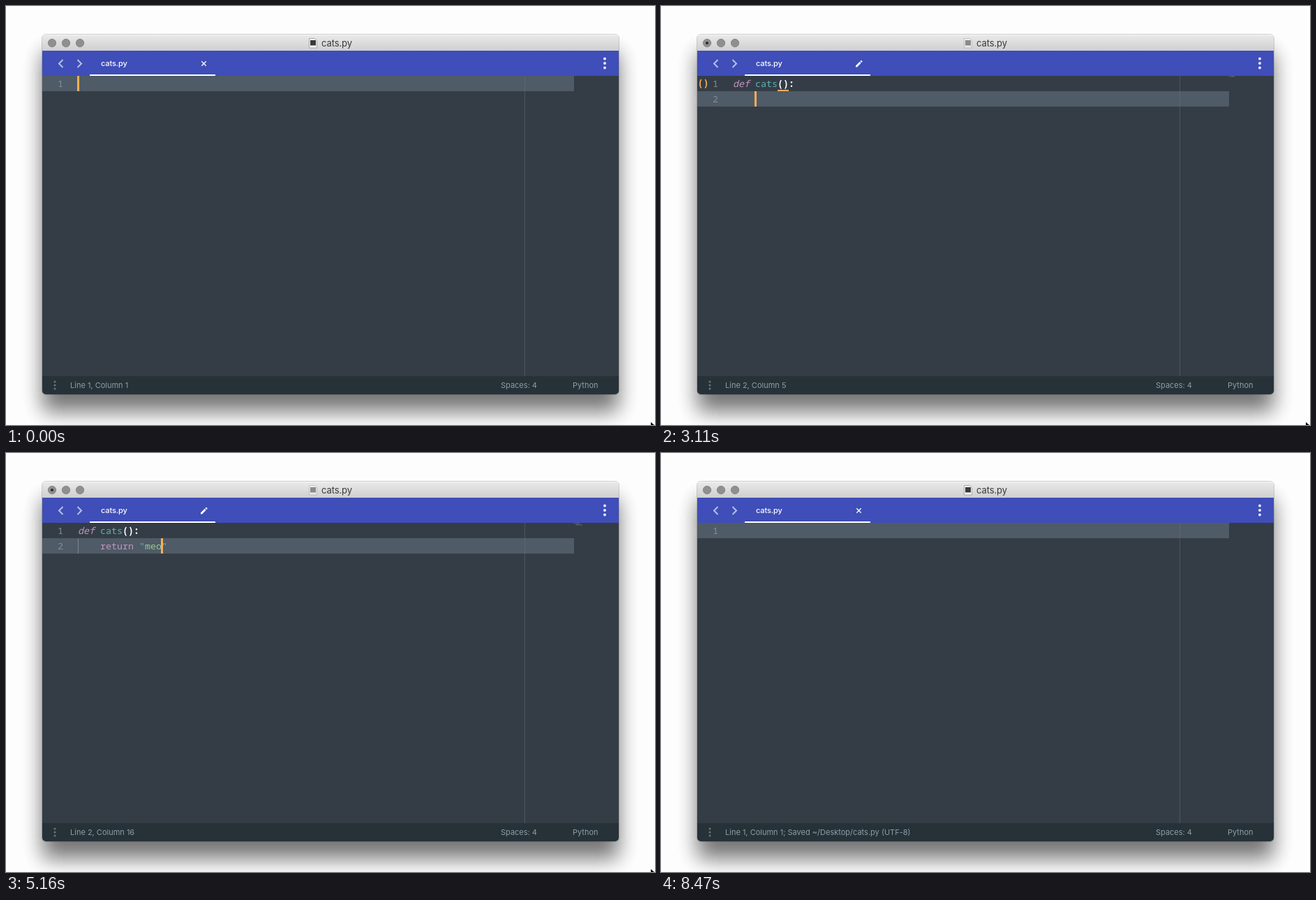
Animation of 930x600 px, one loop 8570 ms. Source, as an HTML page:

```html
<!DOCTYPE html>
<html lang="en">
<head>
<meta charset="utf-8">
<title>cats.py</title>
<style>
  html, body { margin: 0; width: 100%; height: 100%; overflow: hidden; background: #fdfdfd; }
  svg { display: block; }
  text { white-space: pre; }
  .ui { font: 11px Inter, "Open Sans", sans-serif; }
  .title { font-size: 13px; fill: #3a3a3a; letter-spacing: -.1px; }
  .tab { font-weight: 500; fill: #fff; letter-spacing: -.1px; }
  .status { fill: #8c9ea7; }
  .code { font: 13.333px "Noto Sans Mono", "DejaVu Sans Mono", monospace; fill: #d8dee9; }
  .num { fill: #848d96; }
  .def { fill: #c594c5; font-style: italic; }
  .key { fill: #c594c5; }
  .name, .quote { fill: #5fb3b3; }
  .str { fill: #99c794; }
  .punct { fill: #fff; font-weight: 700; }
</style>
</head>
<body>
<svg width="930" height="600" viewBox="0 0 930 600">
  <defs>
    <filter id="shade" filterUnits="userSpaceOnUse" x="-40" y="-20" width="1010" height="720">
      <feGaussianBlur stdDeviation="15"/>
      <feComponentTransfer><feFuncA id="bands" type="discrete"/></feComponentTransfer>
    </filter>
    <linearGradient id="chrome" x2="0" y2="1">
      <stop offset="0" stop-color="#ebeaeb"/>
      <stop offset="1" stop-color="#d0cfd0"/>
    </linearGradient>
    <clipPath id="frame"><rect x="52" y="41" width="826" height="515" rx="5"/></clipPath>
  </defs>

  <rect x="52" y="66" width="826" height="515" rx="5" filter="url(#shade)"/>
  <rect x="51.5" y="40.5" width="827" height="516" rx="5.5" fill="none" stroke="#000" stroke-opacity=".18"/>

  <g clip-path="url(#frame)">
    <rect x="52" y="41" width="826" height="23" fill="url(#chrome)"/>
    <rect x="52" y="41" width="826" height="1" fill="#f6f6f6"/>
    <rect x="52" y="64" width="826" height="36" fill="#3f4eb8"/>
    <rect x="52" y="100" width="826" height="430" fill="#343d46"/>
    <rect x="52" y="530" width="826" height="26" fill="#263238"/>
  </g>

  <g fill="#8f8f91" stroke="#7f7f81" stroke-width=".8">
    <circle cx="66" cy="53" r="5.7"/><circle cx="86" cy="53" r="5.7"/><circle cx="106" cy="53" r="5.7"/>
  </g>
  <circle id="dot" cx="66" cy="53" r="2.1" fill="#2c2c2e"/>

  <g id="doc">
    <path d="M434.5 46.500h8l3 3v10.500h-11z" fill="#fafafa" stroke="#a5a5a5"/>
    <rect x="436" y="49" width="8" height="7.500" fill="#3a3a3c"/>
  </g>
  <text class="ui title" x="452" y="58">cats.py</text>

  <g fill="none" stroke="#b9bfe6" stroke-width="2">
    <path d="M81.500 77l-5.500 5.500 5.500 5.500M102.500 77l5.500 5.500-5.500 5.500"/>
  </g>
  <text class="ui tab" x="136" y="86">cats.py</text>
  <rect x="120" y="98" width="180" height="2" fill="#fff"/>
  <path id="close" d="M280.300 79.300l6.400 6.400m0-6.400l-6.400 6.400" stroke="#fff" stroke-width="1.300"/>
  <path id="pencil" d="M279 87.500v-2l5.700-5.700 2 2-5.700 5.700zM285.400 79.100l1-1q.5-.4 1 0l1 1q.4.5 0 1l-1 1z" fill="#fff"/>
  <g fill="#e8eaf8"><circle cx="858" cy="75.500" r="2"/><circle cx="858" cy="82" r="2"/><circle cx="858" cy="88.500" r="2"/></g>

  <g id="editor"></g>

  <g fill="#647780"><circle cx="70" cy="538" r="1.500"/><circle cx="70" cy="543" r="1.500"/><circle cx="70" cy="548" r="1.500"/></g>
  <text id="status" class="ui status" x="92" y="547"></text>
  <text class="ui status" x="709" y="546.500">Spaces: 4</text>
  <text class="ui status" x="812" y="546.500">Python</text>
  <path id="pointer" d="M924 596v4h5z" fill="#000"/>
</svg>

<script>
const LOOP = 8570, CELL = 8, ROW = 22, LEFT = 103, TOP = 100;
const ORANGE = '#f9ae58', GREEN = '#99c794';
const $ = id => document.getElementById(id);

// Shadow falls off in flat grey bands
$('bands').setAttribute('tableValues',
  Array.from({ length: 40 }, (_, i) => (i * .55 / 40).toFixed(4)).join(' '));

const head = 'def cats():\n    ';
// time, text before the caret, text after it
const edits = [
  [0, '', ''],
  [590, 'd', ''], [790, 'de', ''], [1000, 'def', ''], [1180, 'def ', ''],
  [1480, 'def c', ''], [1560, 'def ca', ''], [1770, 'def cat', ''], [1890, 'def cats', ''],
  [2180, 'def cats(', ')'], [2450, 'def cats()', ''], [2840, 'def cats():', ''],
  [3110, head, ''],
  [3400, head + 'r', ''], [3520, head + 're', ''], [3640, head + 'ret', ''],
  [3750, head + 'retur', ''], [3870, head + 'return', ''], [4040, head + 'return ', ''],
  [4250, head + 'return "', '"'], [4630, head + 'return "m', '"'],
  [4890, head + 'return "me', '"'], [5160, head + 'return "meo', '"'],
  [5330, head + 'return "meow', '"'], [5600, head + 'return "meow"', ''],
  [6870, '', '']
];
// time, caret opacity
const blink = [
  [0, 1], [80, .45], [230, 0], [590, 1], [6580, .45], [6700, 0],
  [6870, 1], [7870, .65], [7970, .3], [8070, 0]
];

const at = (table, t) => table.findLast(step => step[0] <= t);
const during = (t, from, to) => t >= from && t < to;
const rect = (x, y, w, h, fill, extra = '') =>
  `<rect x="${x}" y="${y}" width="${w}" height="${h}" fill="${fill}" ${extra}/>`;
const label = (x, y, cls, text, extra = '') =>
  `<text class="${cls}" x="${x}" y="${y}" ${extra}>${text}</text>`;

const syntax = /(?<def>\bdef\b)|(?<key>\breturn\b)|(?<name>(?<=def )\w+)|(?<str>(?<=")\w+)|(?<quote>")|(?<punct>[():]+)|(?<plain>\w+)/g;

function codeLine(text, row) {
  let out = '';
  for (const m of text.matchAll(syntax)) {
    const kind = Object.keys(m.groups).find(k => m.groups[k]);
    out += label(LEFT + m.index * CELL, TOP + row * ROW + 16, 'code ' + kind, m[0]);
  }
  return out;
}

function miniLine(text, row) {
  return [...text.matchAll(/\S+/g)].map(m =>
    rect(814 + m.index * .7, 100.3 + row * 2, m[0].length * .7, 1.2, '#8a949c', 'opacity=".5"')).join('');
}

function marks(t) {
  const line = (col, cells, row, color) =>
    rect(LEFT + col * CELL, TOP + row * ROW + 20, cells * CELL, 2, color);
  const quotes = y => label(51.5, y, '', '“”',
    `fill="${GREEN}" font-family="Noto Serif, serif" font-weight="700" font-size="17"`);
  let out = '';
  if (during(t, 2180, 3400)) out += line(8, 2, 0, ORANGE);
  if (during(t, 2570, 3400)) out += label(52.5, 115, 'code', '()', `style="fill:${ORANGE};font-weight:600"`);
  if (during(t, 5600, 6870)) out += line(11, 1, 1, GREEN) + line(16, 1, 1, GREEN) + quotes(142);
  if (during(t, 6870, 7350)) out += rect(LEFT, 120.5, 8, 1.5, '#b5bd7c') + quotes(120);
  return out;
}

function statusText(t, row, col) {
  if (during(t, 6050, 6870)) return '2 lines, 29 characters selected';
  const place = `Line ${row + 1}, Column ${col + 1}`;
  return t >= 7435 ? place + '; Saved ~/Desktop/cats.py (UTF-8)' : place;
}

function draw(t) {
  const [, before, after] = at(edits, t);
  const lines = (before + after).split('\n');
  const typed = before.split('\n');
  const row = typed.length - 1, col = typed[row].length;
  const selected = during(t, 6050, 6870);
  const dirty = during(t, 590, 7435);

  let out = rect(52, TOP + row * ROW, 762, ROW, '#4f5b66');
  out += rect(743, 100, 1, 430, '#65737e', 'opacity=".5"');
  lines.forEach((text, i) => {
    const y = TOP + i * ROW;
    if (selected) out += rect(LEFT, y, text.length * CELL, ROW, '#65737e', 'opacity=".75"');
    if (i && text.trim()) out += rect(LEFT, y, 1, ROW, '#78848e');
    out += label(74, y + 16, 'code num', i + 1) + codeLine(text, i) + miniLine(text, i);
  });
  out += marks(t);
  out += rect(102 + col * CELL, TOP + row * ROW, 3, ROW, ORANGE, `opacity="${at(blink, t)[1]}"`);

  $('editor').innerHTML = out;
  $('status').textContent = statusText(t, row, col);
  $('dot').style.opacity = $('pencil').style.opacity = +dirty;
  $('close').style.opacity = +!dirty;
  $('doc').style.opacity = dirty ? .5 : 1;
  $('pointer').style.opacity = +(t < 8470);
}

const start = performance.now();
function tick() {
  draw((performance.now() - start) % LOOP);
  requestAnimationFrame(tick);
}
tick();
</script>
</body>
</html>
```
